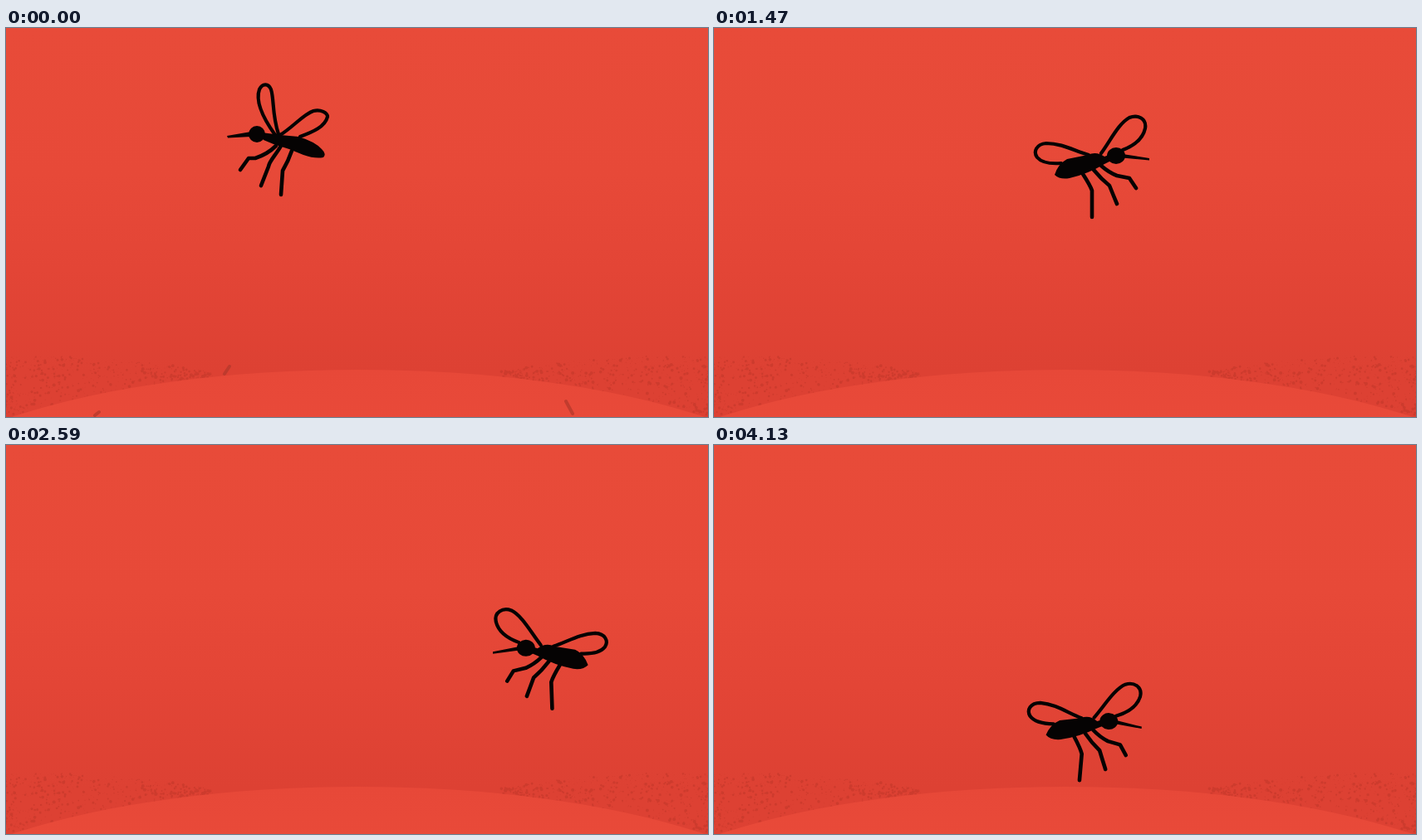
Animation of 845x469 px, one loop 4.2 s. Source, as an HTML page:

```html
<!DOCTYPE html>
<html lang="en">
<head>
<meta charset="utf-8">
<title>Mosquito</title>
<style>
  html, body { margin: 0; width: 100%; height: 100%; overflow: hidden; background: #e84b39; }
  svg { display: block; width: 100%; height: 100%; }
  .line { fill: none; stroke: #050303; stroke-linecap: round; stroke-linejoin: round; }
</style>
</head>
<body>
<svg viewBox="0 0 845 469" preserveAspectRatio="none">
  <defs>
    <linearGradient id="sky" x2="0" y2="1">
      <stop offset="0" stop-color="#e84b39"/>
      <stop offset=".38" stop-color="#e74938"/>
      <stop offset=".62" stop-color="#e34536"/>
      <stop offset=".88" stop-color="#dd4133"/>
    </linearGradient>
    <linearGradient id="ground" x2="0" y2="1">
      <stop offset="0" stop-color="#e74838"/>
      <stop offset=".3" stop-color="#ea4b3a"/>
    </linearGradient>
  </defs>
  <rect width="845" height="469" fill="url(#sky)"/>
  <path id="grit" fill="#c4372b" opacity=".6"/>
  <ellipse cx="424" cy="599" rx="580" ry="187" fill="url(#ground)"/>
  <g id="hairs" fill="none" stroke="#b5382b" stroke-width="4" stroke-linecap="round" opacity=".75"></g>
  <g id="bug">
    <path id="wings" class="line" stroke-width="4.2"/>
    <path id="legs" class="line" stroke-width="4.6"/>
    <path id="body" fill="#050303"/>
    <ellipse id="head" fill="#050303"/>
  </g>
</svg>
<script>
const LOOP = 4200, STEP = 70;
const $ = id => document.getElementById(id);

// Each drawing has its own anchor at the thorax.
const poses = {
  glide: {
    anchor: [325, 133], head: [302, 128, 10, 10],
    wings: "M324 129C309 108 300 88 305 74C309 66 316 67 319 74C323 87 320 103 328 128" +
      "M330 129C346 119 358 104 370 100C379 98 387 102 387 107C384 119 370 125 354 131",
    legs: "M325 142Q315 152 300 157L292 157L282 171M331 142C325 153 317 160 316 167L307 190" +
      "M344 148Q340 160 333 172L331 201",
    body: "M308 126L330 129L352 131Q372 137 380 146Q386 152 382 156Q372 158 358 153Q340 145 322 140L310 135Z" +
      "M266 130L295 125L295 131L267 132.5Z"
  },
  hover: {
    anchor: [432, 187], head: [457, 182, 9.5, 9],
    wings: "M431 182C429 165 426 140 430 126C433 120 441 119 445 127C450 142 449 160 444 172Q440 179 433 183" +
      "M429 183C417 174 400 152 386 143C379 140 374 143 375 150C379 165 395 180 424 184",
    legs: "M416 203Q424 217 427 226Q427 245 425 262M428 199Q434 213 444 223Q443 235 446 254" +
      "M434 196Q445 207 460 212L470 232",
    body: "M450 182L430 184Q405 189 386 194Q377 200 379 208Q386 212 400 208Q425 199 450 190Z" +
      "M464 179L495 184L495 187L464 187Z"
  },
  turn: {
    anchor: [460, 158], head: [484, 154, 11, 10],
    wings: "M466 151C477 136 487 115 500 108C510 104 521 109 519 121C516 135 505 142 492 147" +
      "M451 153C435 149 420 139 400 139C388 140 384 149 389 156C395 163 405 164 418 163",
    legs: "M444 176Q453 190 455 196L455 228M457 171Q466 182 476 190Q480 200 485 212" +
      "M466 166Q475 174 485 178L500 181L508 193",
    body: "M470 155Q460 148 450 153L425 158Q414 164 410 177Q416 183 428 181Q450 176 470 164L478 160V152Z" +
      "M492 152L524 157L524 159.5L492 156.5Z"
  },
  dive: {
    anchor: [203, 95], head: [174, 101, 9, 9],
    wings: "M197 89C186 85 170 65 164 48C161 38 171 35 178 39C188 50 188 70 197 89" +
      "M200 90C208 78 212 50 223 38C231 29 240 34 239 46C237 62 225 78 206 89",
    legs: "M204 104Q196 118 182 134L182 153M208 103C207 118 204 128 204 134Q209 148 212 163" +
      "M221 103Q219 122 220 130Q226 146 235 162",
    body: "M178 96L198 90Q220 85 248 86Q258 90 256 97Q250 103 230 104Q205 105 180 105Z" +
      "M141 119L166 102L171 107L143 119.5Z"
  }
};

const key = (t, x, y, pose, tilt = 0, flip = 1) => ({ t, x, y, pose, tilt, flip });
const keys = [
  key(0, 325, 133, "glide"),
  key(560, 432, 187, "hover"),
  key(1050, 436, 178, "hover"),
  key(1470, 460, 158, "turn"),
  key(1680, 535, 103, "turn"),
  key(2170, 657, 245, "turn", -2, -1),
  key(2590, 650, 248, "turn", -2, -1),
  key(3010, 584, 237, "turn"),
  key(3360, 370, 112, "dive"),
  key(3640, 203, 95, "dive"),
  key(3920, 325, 188, "hover"),
  key(4130, 451, 335, "turn", 5)
];

const slope = (i, axis) => {
  const a = keys[i - 1], b = keys[i + 1];
  return a && b ? (b[axis] - a[axis]) / (b.t - a.t) : 0;
};

function glideAt(i, t, axis) {
  const a = keys[i], b = keys[i + 1];
  if (!b) return a[axis];
  const span = b.t - a.t, u = (t - a.t) / span, v = 1 - u;
  return v * v * (1 + 2 * u) * a[axis] + u * u * (3 - 2 * u) * b[axis] +
    span * u * v * (v * slope(i, axis) - u * slope(i + 1, axis));
}

const hairs = [
  [0, "M263 417L269 408M674 450L682 465M107 467L112 463"],
  [560, "M423 418L427 426M635 437L643 455"],
  [2170, "M427 429L431 448M642 455L646 467"],
  [3640, "M632 434L635 440"]
].map(([start, d]) => {
  const path = document.createElementNS("http://www.w3.org/2000/svg", "path");
  path.setAttribute("d", d);
  $("hairs").append(path);
  return { start, path };
});

function scatterGrit() {
  let seed = 17, d = "";
  const random = () => (seed = seed * 16807 % 2147483647) / 2147483647;
  for (let i = 0; i < 1100; i++) {
    const reach = 250 * random() ** 1.5;
    const x = i % 2 ? 845 - reach : reach;
    const edge = 599 - 187 * Math.sqrt(1 - ((x - 424) / 580) ** 2);
    const y = edge - (6 + 68 * (1 - reach / 250)) * random();
    const r = .4 + 1.7 * random() ** 3;
    d += `M${(x - r).toFixed(1)} ${y.toFixed(1)}a${r} ${r} 0 1 0 ${2 * r} 0a${r} ${r} 0 1 0 ${-2 * r} 0`;
  }
  $("grit").setAttribute("d", d);
}

let shown;
function setPose(name) {
  if (name === shown) return;
  shown = name;
  const pose = poses[name];
  for (const part of ["wings", "legs", "body"]) $(part).setAttribute("d", pose[part]);
  ["cx", "cy", "rx", "ry"].forEach((attr, i) => $("head").setAttribute(attr, pose.head[i]));
}

function draw(time) {
  const t = Math.floor(time % LOOP / STEP) * STEP;
  const i = keys.findLastIndex(k => k.t <= t);
  const next = keys[i + 1];
  const { pose, tilt, flip } = next && t > (keys[i].t + next.t) / 2 ? next : keys[i];
  const [ax, ay] = poses[pose].anchor;
  setPose(pose);
  $("bug").setAttribute("transform",
    `translate(${glideAt(i, t, "x")} ${glideAt(i, t, "y")}) rotate(${tilt}) scale(${flip} 1) translate(${-ax} ${-ay})`);
  for (const { start, path } of hairs)
    path.style.display = t >= start && t < start + 2 * STEP ? "" : "none";
}

scatterGrit();
const begin = performance.now();
(function tick() {
  draw(performance.now() - begin);
  requestAnimationFrame(tick);
})();
</script>
</body>
</html>
```
